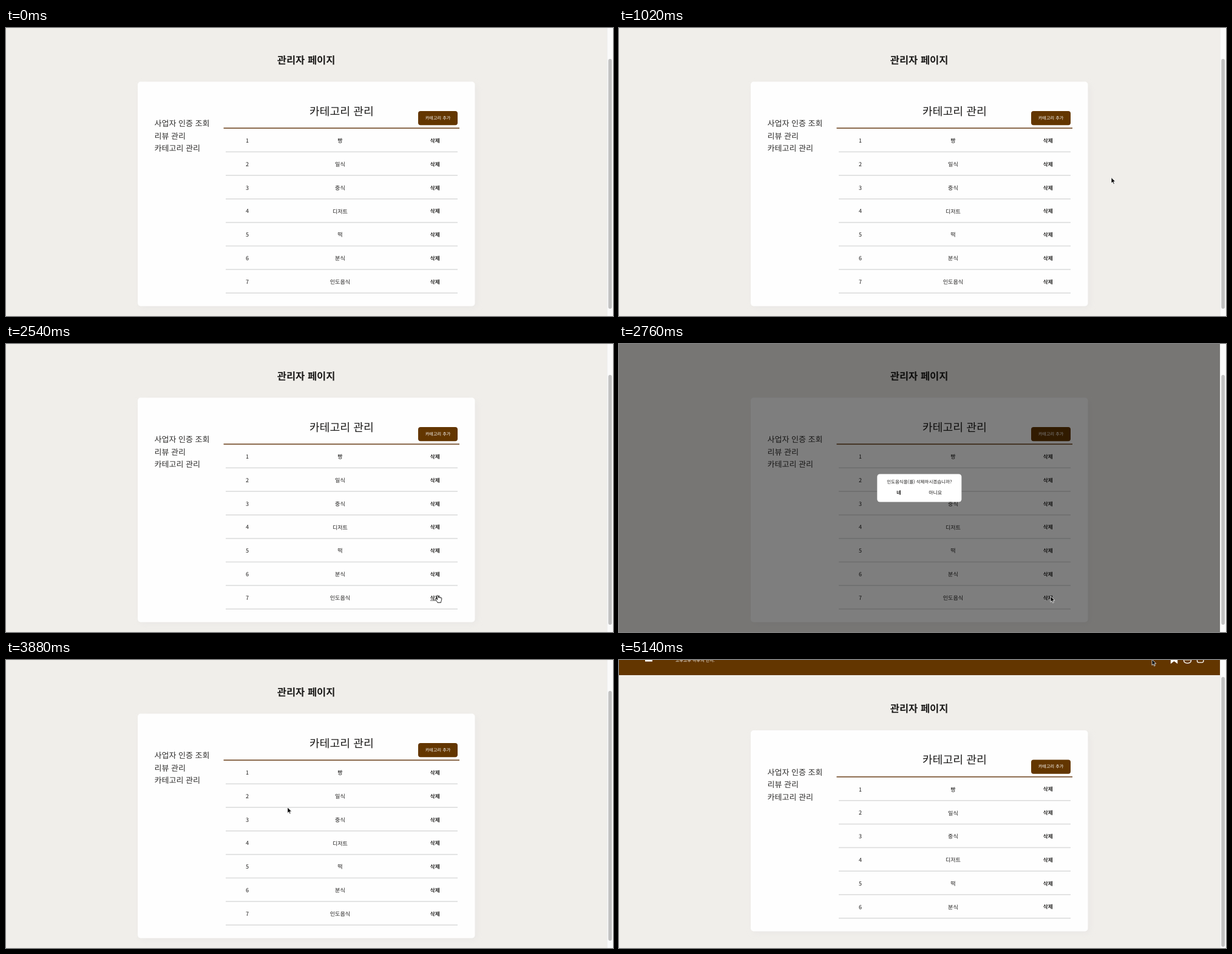
Animation, 1000 px wide and 475 px high, one loop 5250 ms. Source, as an HTML page:

```html
<!DOCTYPE html>
<html lang="ko">
<head>
<meta charset="utf-8">
<title>관리자 페이지</title>
<style>
  html, body { margin: 0; width: 100%; height: 100%; overflow: hidden; background: #f0eeea; }
  svg { display: block; width: 100vw; height: 100vh; }
  text { font-family: "Noto Sans CJK KR", "Noto Sans CJK", "Noto Sans", sans-serif; fill: #1b1a19; text-rendering: geometricPrecision; }
</style>
</head>
<body>
<svg id="stage" viewBox="0 0 1000 475">
  <defs>
    <filter id="soft" x="-10%" y="-10%" width="120%" height="120%"><feGaussianBlur stdDeviation="5"/></filter>
  </defs>
  <rect width="1000" height="475" fill="#f0eeea"/>
  <g id="page">
    <g id="header">
      <rect y="-60" width="990" height="57.5" fill="#633600"/>
      <rect x="43" y="-37" width="12" height="12" fill="#fff"/>
      <g fill="none" stroke="#fff" stroke-width="1.3">
        <path d="M908.8-38H920.2V-21.3L914.5-25.6L908.8-21.3Z" fill="#fff" stroke="none"/>
        <path d="M930.4-27.6H942.6C942.8-23.8 940-22.2 936.5-22.2S930.2-23.8 930.4-27.6Z"/>
        <rect x="952.5" y="-36" width="10.4" height="12.6" rx="2.5"/>
      </g>
    </g>
    <rect id="shade" x="220" y="93" width="556" rx="6" fill="#e4e2e2" opacity=".55" filter="url(#soft)"/>
    <rect id="card" x="217" y="88.5" width="555.5" rx="5" fill="#fefefe"/>
    <rect x="358.5" y="164.3" width="388.5" height="1.8" fill="#7d5837"/>
    <rect x="679" y="137" width="65" height="23.3" rx="4" fill="#633600"/>
  </g>
  <rect id="dim" width="990" height="475" fill="#000" opacity=".5"/>
  <g id="modal">
    <rect x="425.3" y="214.5" width="139" height="46" rx="4.5" fill="#fff"/>
    <rect id="yesLine" x="457.3" y="248.8" width="7.6" height=".8" fill="#222"/>
  </g>
  <rect x="990" width="10" height="475" fill="#fafafa"/>
  <rect x="990" width=".8" height="475" fill="#ebebeb"/>
  <rect id="thumb" x="992.3" width="5.8" rx="2.9" fill="#c1c1c1"/>
  <g id="cursor">
    <path id="arrow" d="M0 0V9.6L2.2 7.6L3.7 11L5.3 10.3L3.8 7H6.8Z" fill="#000" stroke="#fff" stroke-width=".8" stroke-linejoin="round"/>
    <path id="hand" d="M-1.3 0C-1.9-1.6 .1-2 .6-.6L1.7 2.6C2-.1 3.5 1 3.6 2.7C4-.1 5.3 1.7 5.3 3.3C5.8 1.7 7 2.5 6.8 4.2C6.8 7 5.6 8 5.4 10.6H-.1C-.4 8.6-2.7 7-3.3 5.2C-3.6 4-2.2 3.7-1.2 4.9L-.2 5.6Z" fill="#fff" stroke="#111" stroke-width=".9" stroke-linejoin="round"/>
  </g>
</svg>
<script>
const LOOP = 5250, STEP = 38.8;
const OPEN = 2760, CLOSE = 3880, REMOVE = 3960;
const $ = id => document.getElementById(id);

function add(parent, tag, attrs, label = "") {
  const el = document.createElementNS("http://www.w3.org/2000/svg", tag);
  for (const k in attrs) el.setAttribute(k, attrs[k]);
  el.textContent = label;
  return parent.appendChild(el);
}

// y is the middle of the glyphs
function write(parent, label, x, y, size, weight = 400, anchor = "middle", fill = "") {
  const el = add(parent, "text", { x, y: y + size * 0.38, "font-size": size, "font-weight": weight, "text-anchor": anchor }, label);
  if (fill) el.style.fill = fill;
}

const page = $("page"), modal = $("modal");
write($("header"), "고루고루 하루의 한끼.", 93, -27.5, 7.1, 400, "start", "#fff");
write(page, "관리자 페이지", 494.6, 52.5, 16.5, 700);
write(page, "카테고리 관리", 552.8, 137, 18.3, 400);
write(page, "카테고리 추가", 711.6, 148.2, 7.2, 500, "middle", "#fff");
["사업자 인증 조회", "리뷰 관리", "카테고리 관리"].forEach((s, i) =>
  write(page, s, 244.5, 157.5 + 20.4 * i, 13, 500, "start", "#2e2d2c"));

let lastRow;
["빵", "일식", "중식", "디저트", "떡", "분식", "인도음식"].forEach((name, i) => {
  const row = lastRow = add(page, "g", {}), y = 185.6 + STEP * i;
  write(row, i + 1, 397.5, y, 9);
  write(row, name, 550.4, y + 0.2, 9);
  write(row, "삭제", 706.8, y, 8.7, 700, "middle", "#2b2a29");
  add(row, "rect", { x: 362, y: y + 17.9, width: 382, height: 1.6, fill: "#dcdddd" });
});
const underline = add(lastRow, "rect", { x: 698.8, y: 422.6, width: 16, height: 0.8, fill: "#222" });

write(modal, "인도음식을(를) 삭제하시겠습니까?", 494.8, 227.2, 7.5);
write(modal, "네", 461, 245, 8, 700);
write(modal, "아니요", 521.2, 245, 8, 500);

// time, x, y of the pointer tip
const path = [
  [960, 950, 196], [1020, 811, 246.5], [1050, 811, 246.5], [1420, 711, 416],
  [2790, 711, 416], [3250, 520, 274], [3530, 463.8, 243],
  [4050, 463.8, 243], [4550, 680, 118], [5140, 878, -1], [LOOP, 878, -1]
];

function pointer(t) {
  let i = 1;
  while (i < path.length - 1 && t >= path[i][0]) i++;
  const [t0, x0, y0] = path[i - 1], [t1, x1, y1] = path[i];
  const u = Math.min(1, Math.max(0, (t - t0) / (t1 - t0)));
  const k = u * (2 - u);
  return [x0 + (x1 - x0) * k, y0 + (y1 - y0) * k];
}

const show = (el, on) => el.setAttribute("visibility", on ? "visible" : "hidden");

function size(el, top, bottom) {
  el.setAttribute("y", top);
  el.setAttribute("height", bottom - top);
}

function draw(t) {
  const open = t >= OPEN && t < CLOSE;
  const removed = t >= REMOVE;
  const hover = t >= 1400 && t < OPEN;
  const bottom = removed ? 458.7 - STEP : 458.7;

  page.setAttribute("transform", `translate(0 ${removed ? 27.5 : 0})`);
  size($("card"), 88.5, bottom);
  size($("shade"), 93, bottom + 3);
  size($("thumb"), removed ? 28 : 51, removed ? 473 : 463);
  show(lastRow, !removed);
  show(underline, hover);
  show($("dim"), open);
  show(modal, open);
  show($("yesLine"), open && t >= 3460);

  const [x, y] = pointer(t), on = t >= 960;
  $("cursor").setAttribute("transform", `translate(${x} ${y})`);
  show($("arrow"), on && !hover);
  show($("hand"), on && hover);
}

function tick() {
  draw(performance.now() % LOOP);
  requestAnimationFrame(tick);
}
tick();
</script>
</body>
</html>
```
